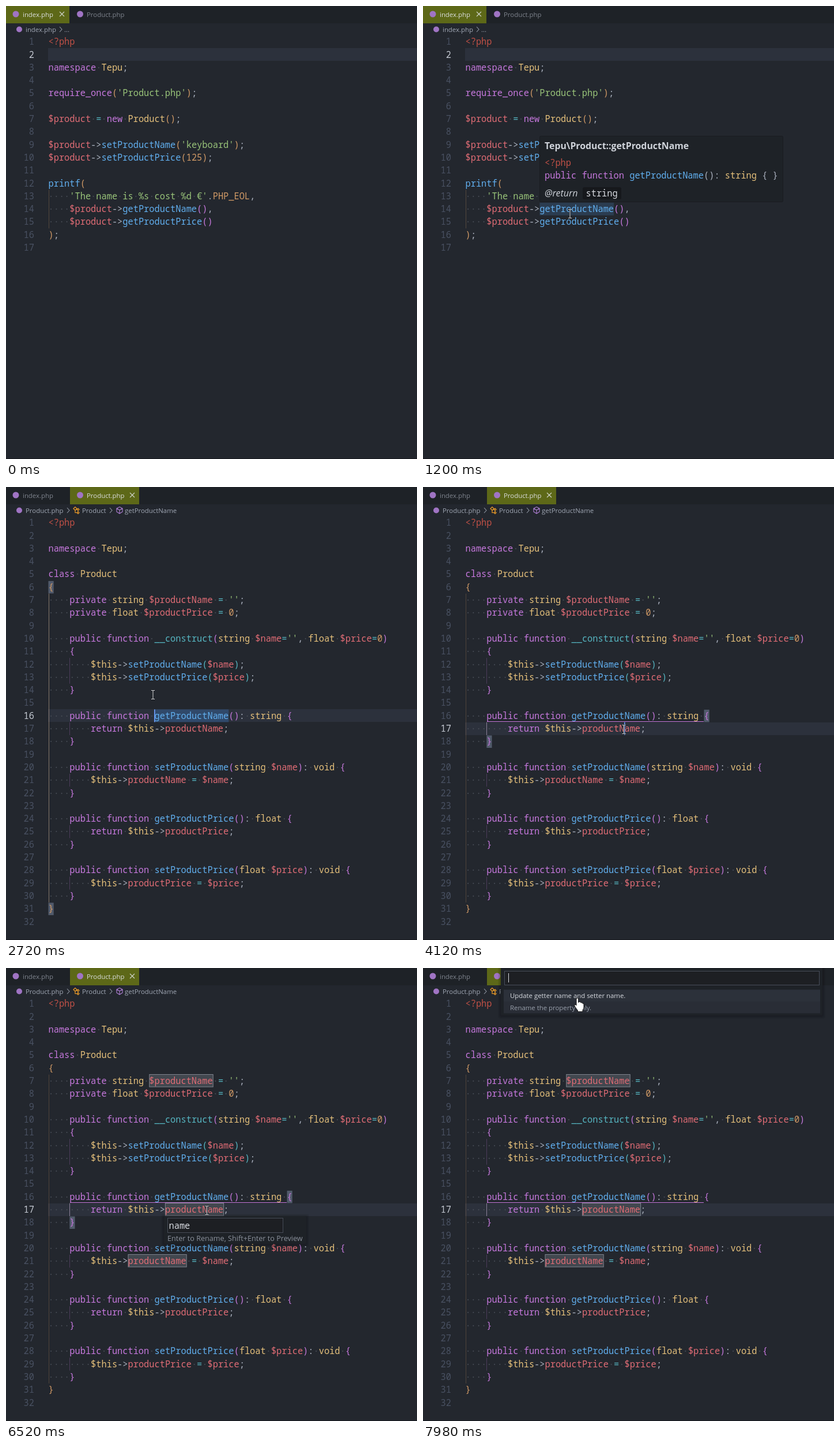
An HTML page for the animation above (8000 ms loop, 713 by 785 pixels).

```html
<!DOCTYPE html>
<html lang="en">
<head>
<meta charset="utf-8">
<title>Rename a property</title>
<style>
html, body { margin: 0; width: 100%; height: 100%; overflow: hidden; background: #23272e; }
svg { display: block; width: 713px; height: 785px; }
text { white-space: pre; }
.mono { font: 15.333px "Noto Sans Mono", monospace; font-variant-ligatures: none; }
.ui { font: 11.4px "Open Sans", "Noto Sans", sans-serif; }
</style>
</head>
<body>
<svg id="stage" viewBox="0 0 713 785" xmlns="http://www.w3.org/2000/svg"></svg>
<script>
const LOOP = 8000, LEFT = 73.5, CHAR = 9.2, TOP = 50.9, ROW = 22.3;
const C = {
  fg: '#abb2bf', purple: '#c678dd', red: '#e06c75', green: '#98c379', blue: '#61afef',
  yellow: '#e5c07b', orange: '#d19a66', cyan: '#56b6c2', tag: '#be5046'
};
const PAIRS = [C.orange, C.purple, C.cyan];
const KEYWORDS = /^(namespace|require_once|new|class|private|public|function|return)$/;
const TYPES = /^(string|float|void|Product|Tepu)$/;

const INDEX = `<?php

namespace Tepu;

require_once('Product.php');

$product = new Product();

$product->setProductName('keyboard');
$product->setProductPrice(125);

printf(
    'The name is %s cost %d €'.PHP_EOL,
    $product->getProductName(),
    $product->getProductPrice()
);
`;

const PRODUCT = `<?php

namespace Tepu;

class Product
{
    private string $productName = '';
    private float $productPrice = 0;

    public function __construct(string $name='', float $price=0)
    {
        $this->setProductName($name);
        $this->setProductPrice($price);
    }

    public function getProductName(): string {
        return $this->productName;
    }

    public function setProductName(string $name): void {
        $this->productName = $name;
    }

    public function getProductPrice(): float {
        return $this->productPrice;
    }

    public function setProductPrice(float $price): void {
        $this->productPrice = $price;
    }
}
`;

const stage = document.getElementById('stage');

function el(tag, attrs, parent, content) {
  const node = document.createElementNS('http://www.w3.org/2000/svg', tag);
  for (const key in attrs) node.setAttribute(key, attrs[key]);
  if (content !== undefined) node.textContent = content;
  parent.appendChild(node);
  return node;
}
const group = (parent = stage) => el('g', {}, parent);
const rect = (p, x, y, width, height, fill, more) => el('rect', { x, y, width, height, fill, ...more }, p);
const line = (p, d, stroke, width = 1, fill = 'none') =>
  el('path', { d, stroke, fill, 'stroke-width': width }, p);
const mono = (p, x, y, fill, s) => el('text', { x, y, fill, class: 'mono' }, p, s);
const ui = (p, x, y, fill, s, style = '') => el('text', { x, y, fill, style, class: 'ui' }, p, s);
const dot = (p, cx, cy, r = 5.5) => el('circle', { cx, cy, r, fill: '#a074c4' }, p);
const colX = col => LEFT + col * CHAR;
const rowY = row => TOP + (row - 1) * ROW;
const show = (node, on) => { node.style.display = on ? '' : 'none'; };

function colorOf(token, next, state, plain) {
  if (token === '<?php') return C.tag;
  if (token[0] === "'") return C.green;
  if (token === '$this') return C.yellow;
  if (token[0] === '$') return C.red;
  if (KEYWORDS.test(token)) return C.purple;
  if (TYPES.test(token)) return C.yellow;
  if (token === '__construct' || token === '=') return C.cyan;
  if (/^\d|^PHP_EOL/.test(token)) return C.orange;
  if (/^\w/.test(token)) return next === '(' ? C.blue : C.red;
  if (plain) return C.fg;
  if (/[({]/.test(token)) return PAIRS[state.depth++ % 3];
  if (/[)}]/.test(token)) return PAIRS[--state.depth % 3];
  return C.fg;
}

function codeLine(p, s, x, y, state, plain) {
  let col = 0;
  const tokens = s.match(/'[^']*'|<\?php|\$\w+|\w+|->|./g) || [];
  tokens.forEach((token, i) => {
    const color = token === ' ' ? '' : colorOf(token, tokens[i + 1], state, plain);
    for (const part of token.match(/ |[^ ]+/g)) {
      if (part !== ' ') mono(p, x + col * CHAR, y, color, part);
      else if (!plain) mono(p, x + col * CHAR, y, '#484d56', '·');
      col += part.length;
    }
  });
}

function codePage(p, source) {
  const state = { depth: 0 };
  return source.split('\n').map((s, i) => {
    const y = rowY(i + 1) + 16.3;
    codeLine(p, s, LEFT, y, state);
    const num = mono(p, 49, y, '#495162', i + 1);
    num.setAttribute('text-anchor', 'end');
    return num;
  });
}

function guide(p, col, from, to, color, opacity) {
  return rect(p, Math.round(colX(col)), rowY(from), 1, (to - from + 1) * ROW, color, { opacity });
}
function wordBox(p, row, col, len) {
  return rect(p, colX(col) + .5, Math.round(rowY(row)) - .5, len * CHAR, 21.5, '#42474f', { stroke: '#7f848e' });
}
function bracketBox(p, row, col) {
  return rect(p, colX(col), rowY(row) + .5, CHAR, 21.5, '#515a6b');
}
function cross(p, x, y) {
  line(p, `M${x - 4} ${y - 4}l8 8m0 -8l-8 8`, '#d0d4cc', 1.1);
}
function chevron(p, x) {
  line(p, `M${x - 2} 36l4 4.5l-4 4.5`, '#9198a4', 1.1);
}
function shadowBox(p, x, y, w, h) {
  for (let i = 5; i > 0; i--) {
    rect(p, x - i, y - i + 1, w + 2 * i, h + 2 * i, '#000', { opacity: .05, rx: 4 });
  }
  rect(p, x, y, w, h, '#1e2227', { rx: 2 });
}

// Editor background layers
rect(stage, 0, 0, 713, 785, '#23272e');
const current = rect(stage, 73, 0, 640, 22, '#2c313c');

// First file
const index = group();
const hoverWord = rect(index, colX(14), rowY(14), 14 * CHAR, 22, '#2b3c50');
const usedWord = wordBox(index, 14, 14, 14);
guide(index, 0, 13, 15, C.orange, .28);
const callScope = group(index);
guide(callScope, 0, 13, 15, C.orange, .6);
rect(callScope, 74, 317, 55, 1, C.orange);
const indexNums = codePage(index, INDEX);
ui(index, 34, 44.5, '#a0a7b4', 'index.php');
chevron(index, 95);
ui(index, 101, 44.5, '#a0a7b4', '...');

// Second file
const product = group();
const foundWord = rect(product, colX(20), rowY(16), 14 * CHAR, 22, '#30496a');
const classPair = group(product), methodPair = group(product), uses = group(product);
bracketBox(classPair, 6, 0);
bracketBox(classPair, 31, 0);
bracketBox(methodPair, 16, 45);
bracketBox(methodPair, 18, 4);
wordBox(uses, 7, 19, 12);
wordBox(uses, 17, 22, 11);
wordBox(uses, 21, 15, 11);
guide(product, 0, 7, 30, C.orange, .25);
[[12, 13], [17, 17], [21, 21], [25, 25], [29, 29]].forEach(([a, b]) => guide(product, 4, a, b, C.purple, .25));
const classScope = guide(product, 0, 7, 30, '#c8b8a8', .45);
const methodScope = group(product);
guide(methodScope, 4, 17, 17, '#c8c0cc', .5);
rect(methodScope, 111, 406, 376, 1, C.purple);
const productNums = codePage(product, PRODUCT);
ui(product, 34, 44.5, '#a0a7b4', 'Product.php');
chevron(product, 108);
line(product, 'M117 37.5l3 -3l3 3l-3 3zM121.5 39h3M120 40.5v4h4.5', '#ee9d28', 1.2);
line(product, 'M125 37l2 2l-2 2l-2 -2zM125 42.5l2 2l-2 2l-2 -2z', '#ee9d28', 1.1);
ui(product, 132, 44.5, '#a0a7b4', 'Product');
chevron(product, 182);
line(product, 'M197 34.5l5 2.5v6l-5 3l-5 -3v-6zM192 37l5 3l5 -3M197 40v6', '#b180d7', 1.1);
ui(product, 206, 44.5, '#a0a7b4', 'getProductName');
dot(stage, 23, 40.5, 5);

// Tabs
rect(stage, 0, 0, 713, 30, '#1e2227');
const OLIVE = '#5d6818';
const tabA = group(), tabB = group();
rect(tabA, 0, 0, 110, 30, OLIVE);
cross(tabA, 97, 14);
rect(tabB, 111, 0, 120, 30, OLIVE);
cross(tabB, 219, 14);
dot(stage, 17, 14);
dot(stage, 128.5, 14);
const nameA = ui(stage, 29, 18.5, '#fff', 'index.php');
const nameB = ui(stage, 140, 18.5, '#fff', 'Product.php');
const progress = rect(stage, 0, 28, 14, 2, '#3f8cf2');
rect(stage, 0, 784, 713, 1, '#17191e');

const caret = rect(stage, 0, 0, 1.6, 22, '#6ea0ff');

// Hover card
const card = group();
rect(card, 202.5, 225.5, 422, 114, '#1e2227', { stroke: '#191c21', rx: 2 });
ui(card, 211, 248, '#cfd3da', 'Tepu\\Product::getProductName', 'font-size:15.85px;font-weight:700');
codeLine(card, '<?php', 211, 277, {}, true);
codeLine(card, 'public function getProductName(): string { }', 211, 299.3, {}, true);
ui(card, 211, 330, '#cfd3da', '@return', 'font-size:16px;font-style:italic');
rect(card, 277, 314, 67, 21, '#16181c', { rx: 3 });
mono(card, 282.5, 330, '#d7dae0', 'string');

// Rename box
const rename = group();
shadowBox(rename, 274, 430, 247, 48);
rect(rename, 280.5, 433.5, 200, 25, '#1d1f23', { stroke: '#464c57' });
const picked = rect(rename, 282.5, 436, 101.5, 20, '#0a60d0');
const typed = mono(rename, 282.5, 451.5, '#d7dae0', '');
const typeCaret = rect(rename, 319, 436, 1, 20, '#d7dae0');
ui(rename, 280, 473, '#8b919c', 'Enter to Rename, Shift+Enter to Preview', 'font-size:12.65px');

// Choice list
const picker = group();
shadowBox(picker, 135, -4, 558, 86);
rect(picker, 141.5, 5.5, 546, 24, '#1d1f23', { stroke: '#484e59' });
const pickCaret = rect(picker, 148, 9, 1, 16, '#d7dae0');
rect(picker, 140, 37.5, 549, 20.5, '#2c313a');
const second = rect(picker, 140, 58, 549, 20.5, '#292d36');
ui(picker, 151, 52, '#d7dae0', 'Update getter name and setter name.');
ui(picker, 151, 72.5, '#9aa1ad', 'Rename the property only.');

// Pointers
const beam = group(), hand = group();
const beamPath = 'M-3 -7.5h2.5l.5 .7l.5 -.7h2.5M0 -7v14M-3 7.5h2.5l.5 -.7l.5 .7h2.5';
line(beam, beamPath, '#15171b', 2.2);
line(beam, beamPath, '#e4e6ea', 1);
line(hand, 'M-2 -7q0 -2 1.8 -2t1.8 2v6l1 -1.5q2.5 -.6 3 1.5q2.6 -.7 3 1.2q2.4 -.3 2.4 2v4q0 3 -2 6v2.5h-8.500v-2q-3 -3.500 -5.500 -8q-.8 -2.300 1.200 -2.300q1 .1 1.800 1.400z',
  '#111', 1, '#fff');

const between = (t, a, b) => t >= a && t < b;
// Each stop is [time, x, y]
const ENTER = [[120, 671, 775], [300, 520, 560], [480, 360, 380], [640, 275, 308], [860, 255, 360]];
const TO_WORD = [[3510, 255, 360], [3740, 312, 398], [3960, 348.5, 420]];
const TO_LIST = [[7560, 348, 420], [7700, 325, 300], [7850, 285, 120], [7980, 268, 61]];

function along(stops, t) {
  if (t <= stops[0][0]) return stops[0].slice(1);
  for (let i = 1; i < stops.length; i++) {
    const [ta, xa, ya] = stops[i - 1], [tb, xb, yb] = stops[i];
    if (t < tb) {
      const k = (t - ta) / (tb - ta);
      return [xa + (xb - xa) * k, ya + (yb - ya) * k];
    }
  }
  return stops[stops.length - 1].slice(1);
}

function placeCaret(t) {
  let row = 0, col = 20;
  if (between(t, 1330, 1790) || between(t, 2320, 2720)) row = 14;
  else if (between(t, 2720, 3180) || between(t, 3680, 4020)) row = 16;
  else if (between(t, 4020, 4470)) { row = 17; col = 30; }
  show(caret, row);
  if (!row) return;
  caret.setAttribute('x', Math.floor(colX(col)));
  caret.setAttribute('y', rowY(row));
}

function update(t) {
  const second_ = t >= 2720, inMethod = t >= 4020, listOpen = t >= 6780;
  show(index, !second_);
  show(product, second_);
  show(tabA, !second_);
  show(tabB, second_);
  nameA.setAttribute('fill', second_ ? '#7f848e' : '#dcdfe0');
  nameB.setAttribute('fill', second_ ? '#dcdfe0' : '#7f848e');

  const row = t < 1330 ? 2 : t < 2720 ? 14 : t < 4020 ? 16 : 17;
  current.setAttribute('y', Math.round(rowY(row)));
  (second_ ? productNums : indexNums).forEach((n, i) =>
    n.setAttribute('fill', i + 1 === row ? '#c5cad3' : '#495162'));

  show(hoverWord, between(t, 1060, 1460));
  show(usedWord, t >= 1600);
  show(callScope, t >= 1330);
  show(card, between(t, 1060, 1330));
  card.setAttribute('opacity', Math.min(1, .3 + (t - 1060) / 140));

  show(foundWord, t < 2980);
  show(classPair, !inMethod);
  show(classScope, !inMethod);
  show(methodPair, inMethod && !listOpen);
  show(methodScope, inMethod);
  show(uses, t >= 4270);
  placeCaret(t);

  show(rename, between(t, 4600, 6720));
  const letters = Math.min(4, Math.floor((t - 5660) / 110) + 1);
  const typing = t >= 5660;
  typed.textContent = typing ? 'name'.slice(0, letters) : 'productName';
  typed.setAttribute('fill', typing ? '#d7dae0' : '#fff');
  show(picked, between(t, 4730, 5660));
  show(typeCaret, between(t, 5660, 6520));
  typeCaret.setAttribute('x', Math.floor(282.5 + letters * CHAR));

  show(picker, listOpen);
  show(pickCaret, !between(t, 7280, 7780));
  show(second, t >= 7850);
  show(progress, between(t, 6920, 7410));
  const p = (t - 6920) / 2000, w = 14.26 * (1 + 2 * p);
  progress.setAttribute('x', Math.max(0, 14.26 * (25 * p + .5) - w / 2));
  progress.setAttribute('width', Math.max(0, w));

  const [x, y] = along(t < 3510 ? ENTER : t < 7560 ? TO_WORD : TO_LIST, t);
  const overList = listOpen && y < 84;
  show(beam, t >= 120 && !overList);
  show(hand, overList);
  (overList ? hand : beam).setAttribute('transform', `translate(${x} ${y})`);
}

const start = performance.now();
function tick() {
  update((performance.now() - start) % LOOP);
  requestAnimationFrame(tick);
}
tick();
</script>
</body>
</html>
```
